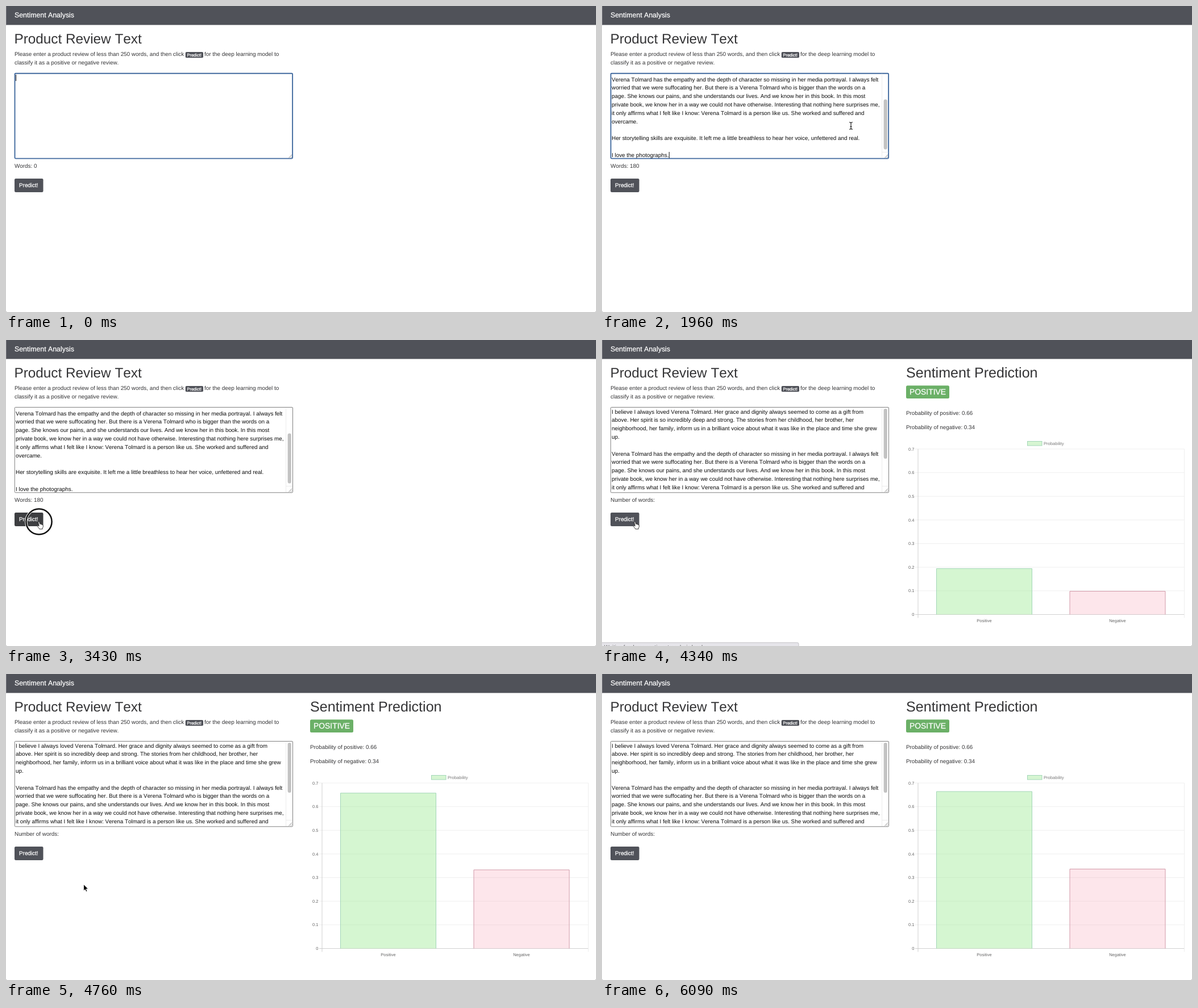
An HTML page that plays this animation: 1038x539 px, repeating every 6160 ms.

```html
<!DOCTYPE html>
<html lang="en">
<head>
<meta charset="utf-8">
<title>Sentiment Analysis</title>
<style>
  html, body { margin: 0; width: 100%; height: 100%; overflow: hidden; background: #fff; }
  svg { display: block; width: 1038px; height: 539px; }
  text {
    font-family: "Liberation Sans", Arial, sans-serif;
    font-kerning: none;
    text-rendering: geometricPrecision;
    white-space: pre;
  }
</style>
</head>
<body>
<svg id="stage" viewBox="0 0 1038 539"></svg>
<script>
const LOOP = 6160, STEP = 70;
const PASTE = 1750, CLICK = 3430, RESULT = 4340;
const DARK = '#505259', INK = '#343436', BODY = 9.88, LINE = 14.8, SCROLL = 71;

const review = `I believe I always loved Verena Tolmard. Her grace and dignity always seemed to come as a gift from
above. Her spirit is so incredibly deep and strong. The stories from her childhood, her brother, her
neighborhood, her family, inform us in a brilliant voice about what it was like in the place and time she grew
up.

Verena Tolmard has the empathy and the depth of character so missing in her media portrayal. I always felt
worried that we were suffocating her. But there is a Verena Tolmard who is bigger than the words on a
page. She knows our pains, and she understands our lives. And we know her in this book. In this most
private book, we know her in a way we could not have otherwise. Interesting that nothing here surprises me,
it only affirms what I felt like I know: Verena Tolmard is a person like us. She worked and suffered and
overcame.

Her storytelling skills are exquisite. It left me a little breathless to hear her voice, unfettered and real.

I love the photographs.`.split('\n');

// time, x, y of the pointer hotspot
const track = [
  [0, 229, 147.5], [980, 229, 147.5], [1330, 440, 196], [1540, 440, 196], [1820, 438, 211],
  [2170, 438, 211], [2520, 464, 436], [2730, 466, 440], [2800, 466, 436], [3290, 60, 321],
  [3360, 58, 320], [4340, 58, 320], [4480, 135, 369], [4900, 137, 371], [6160, 137, 371]
];

const text = (x, y, str, size = BODY, fill = INK, extra = '') =>
  `<text x="${x}" y="${y}" font-size="${size}" fill="${fill}" ${extra}>${str}</text>`;
const rect = (x, y, w, h, fill, extra = '') =>
  `<rect x="${x}" y="${y}" width="${w}" height="${h}" fill="${fill}" ${extra}/>`;
const path = (d, extra) => `<path d="${d}" ${extra}/>`;
const semibold = 'stroke="#fff" stroke-width=".25"';

const TOP = 192, ZERO = 483.5, UNIT = (ZERO - TOP) / 0.7;
const bars = [
  { name: 'Positive', x: 588.5, value: 0.664, fill: 'rgba(144,230,135,.38)', stroke: '#a3d6b8' },
  { name: 'Negative', x: 823, value: 0.336, fill: 'rgba(243,140,165,.22)', stroke: '#d29aa9' }
];
const BAR_WIDTH = 168;

function chart() {
  let out = '';
  for (let i = 0; i <= 7; i++) {
    const y = ZERO - i * UNIT / 10;
    out += path(`M551 ${y}H1024.5`, `stroke="${i ? '#ebebeb' : '#c6c6c6'}" stroke-width=".8"`);
    out += text(549.5, y + 2.6, i ? (i / 10).toFixed(1) : '0', 7.5, '#666', 'text-anchor="end"');
  }
  out += path(`M556 ${TOP}V489.5`, 'stroke="#c6c6c6" stroke-width=".8"');
  out += path(`M1024.5 ${TOP}V489.5`, 'stroke="#ebebeb" stroke-width=".8"');
  out += rect(748.5, 178.5, 25.5, 7.5, '#d6f5d2', 'stroke="#a3d6b8"');
  out += text(777, 184.8, 'Probability', 7.6, '#777');
  bars.forEach((b, i) => {
    out += path('', `id="bar${i}" fill="${b.fill}" stroke="${b.stroke}"`);
    out += text(b.x + BAR_WIDTH / 2, 497, b.name, 7.5, '#666', 'text-anchor="middle"');
  });
  return out;
}

const stage = document.getElementById('stage');
stage.innerHTML = `
  <clipPath id="box">${rect(16, 120, 476.5, 148, '#000')}</clipPath>
  ${rect(0, 0, 1038, 539, '#fff')}
  ${rect(0, 0, 1038, 33.4, DARK)}
  ${rect(0, 0, 0.7, 33.4, '#8a8b90')}
  ${path('M0 536.5Q0 539 2.5 539H0ZM1038 536.5Q1038 539 1035.5 539H1038Z', 'fill="#aaa"')}
  ${text(15, 19.7, 'Sentiment Analysis', 12.35, '#fff', semibold)}
  ${text(14.5, 66, 'Product Review Text', 24.3)}
  ${text(15, 88.2, 'Please enter a product review of less than 250 words, and then click')}
  ${rect(315.7, 81, 31.3, 10.2, DARK, 'rx="2"')}
  ${text(318.4, 88.7, 'Predict!', 7.5, '#fff', semibold)}
  ${text(349, 88.2, 'for the deep learning model to')}
  ${text(15, 103, 'classify it as a positive or negative review.')}
  <rect id="area" rx="1.5" fill="#fff"/>
  <g clip-path="url(#box)"><g id="review">
    ${review.map((s, i) => text(17, 129.5 + i * LINE, s, BODY, '#0c0c0c')).join('')}
  </g></g>
  <g id="scrollbar">
    ${path('M492.5 119.5V268M492.5 257.5H503.5', 'stroke="#ececec" fill="none"')}
    <rect id="thumb" x="495.6" width="6.2" height="88" rx="3.1" fill="#c3c3c3"/>
  </g>
  ${path('M497.5 267.5L503 262M500.8 267.5L503 265.3', 'stroke="#777" stroke-width=".8"')}
  <rect id="caret" width="1" height="11" fill="#111"/>
  ${text(15, 284.5, '', BODY, INK, 'id="words"')}
  <rect id="button" x="15" y="304" width="50.5" height="24" rx="2.2"/>
  ${text(23, 318.8, 'Predict!', BODY, '#fff', semibold)}
  <g id="result">
    ${text(535, 66, 'Sentiment Prediction', 25.1)}
    ${rect(535, 80.3, 76, 22.6, '#6bb067', 'rx="2.5"')}
    ${text(541, 96, 'POSITIVE', 13.9, '#fff', semibold)}
    ${text(535, 132.4, 'Probability of positive: 0.66', 9.8)}
    ${text(535, 157.4, 'Probability of negative: 0.34', 9.8)}
    ${chart()}
  </g>
  <g id="status">
    ${rect(-4, 533, 350, 12, '#e6e5ea', 'rx="2.5" stroke="#bcbbc0" stroke-width=".9"')}
    ${text(4, 544.4, 'Waiting for demo.sentiment-analysis.local...', 9.4, '#555')}
  </g>
  <g id="ring" fill="none">
    <circle cx="58" cy="320" r="22.6" stroke="#fff" stroke-width="4.4"/>
    <circle cx="58" cy="320" r="22.6" stroke="#111" stroke-width="2.5"/>
  </g>
  <g id="pointer">
    ${path('M-3-6.2Q0-6.2 0-4.5Q0-6.2 3-6.2M0-5V5M-3 6.2Q0 6.2 0 4.5Q0 6.2 3 6.2M-1.5 1.5H1.5',
      'id="ibeam" fill="none" stroke="#111" stroke-width="1.1"')}
    ${path('M0 0V11.6L2.7 9.1L4.4 13L6.4 12.1L4.7 8.3H8.3Z',
      'id="arrow" fill="#000" stroke="#fff" stroke-width=".9"')}
    ${path('M-1.4 0.8Q-.4-.6.7.8L1.9 4.6Q3-.0 3.9 4.9Q5.2 4.1 5.6 5.6Q7.2 5 7.3 6.8Q7.7 10 6.2 11.2V13H.9Q-.2 11-2 9.2Q-3.6 7.3-1.9 6.7L.2 7.7Z',
      'id="hand" fill="#fff" stroke="#111" stroke-width=".8" stroke-linejoin="round"')}
  </g>`;

const el = {};
stage.querySelectorAll('[id]').forEach(node => el[node.id] = node);

const clamp = v => Math.max(0, Math.min(1, v));
const set = (node, attrs) => { for (const k in attrs) node.setAttribute(k, attrs[k]); };
const show = (node, on) => set(node, { visibility: on ? 'visible' : 'hidden' });

function pointerAt(t) {
  const i = track.findIndex((p, n) => n && t <= p[0]);
  const [t0, x0, y0] = track[i - 1], [t1, x1, y1] = track[i];
  const k = (t - t0) / (t1 - t0), e = k * k * (3 - 2 * k);
  return [x0 + (x1 - x0) * e, y0 + (y1 - y0) * e];
}

function drawPointer(t) {
  const [x, y] = pointerAt(t);
  const inArea = x > 15 && x < 505 && y > 118 && y < 269;
  const onButton = x > 15 && x < 65.5 && y > 304 && y < 328;
  show(el.ibeam, inArea);
  show(el.hand, onButton);
  show(el.arrow, !inArea && !onButton);
  set(el.pointer, {
    transform: `translate(${x} ${y})`,
    opacity: clamp((t - 700) / 210) * clamp((5810 - t) / 210)
  });
  return onButton;
}

function draw(t) {
  const pasted = t >= PASTE, focused = t < CLICK, done = t >= RESULT;
  const scrolled = pasted && !done;

  set(el.area, focused
    ? { x: 15.5, y: 118.8, width: 488.6, height: 149.8, stroke: '#426a9f', 'stroke-width': 1.9 }
    : { x: 15.3, y: 118.5, width: 489.2, height: 150.3, stroke: '#808080', 'stroke-width': 1 });
  show(el.review, pasted);
  show(el.scrollbar, pasted);
  set(el.review, { transform: `translate(0 ${scrolled ? -SCROLL : 0})` });
  set(el.thumb, { y: scrolled ? 164.5 : 121 });

  const blink = pasted ? (t - PASTE) % 980 < 490 : t < 490 || (t >= 1050 && t < 1540);
  set(el.caret, pasted ? { x: 117.7, y: 257 } : { x: 17, y: 121 });
  show(el.caret, focused && blink);
  el.words.textContent = done ? 'Number of words:' : 'Words: ' + (pasted ? 180 : 0);

  const hover = drawPointer(t);
  set(el.button, { fill: hover && !done ? '#3d3e41' : DARK });
  set(el.ring, { opacity: t < CLICK ? 0 : clamp((3850 - t) / 350) });
  show(el.status, t >= 3640 && t < 4690);

  show(el.result, done);
  const grow = 1 - (1 - clamp((t - 4282) / 700)) ** 4;
  bars.forEach((b, i) => {
    const top = ZERO - b.value * grow * UNIT;
    set(el['bar' + i], { d: `M${b.x} ${ZERO}V${top}H${b.x + BAR_WIDTH}V${ZERO}` });
  });
}

const start = performance.now();
function tick() {
  const t = (performance.now() - start) % LOOP;
  draw(Math.floor(t / STEP) * STEP);
  requestAnimationFrame(tick);
}
tick();
</script>
</body>
</html>
```
